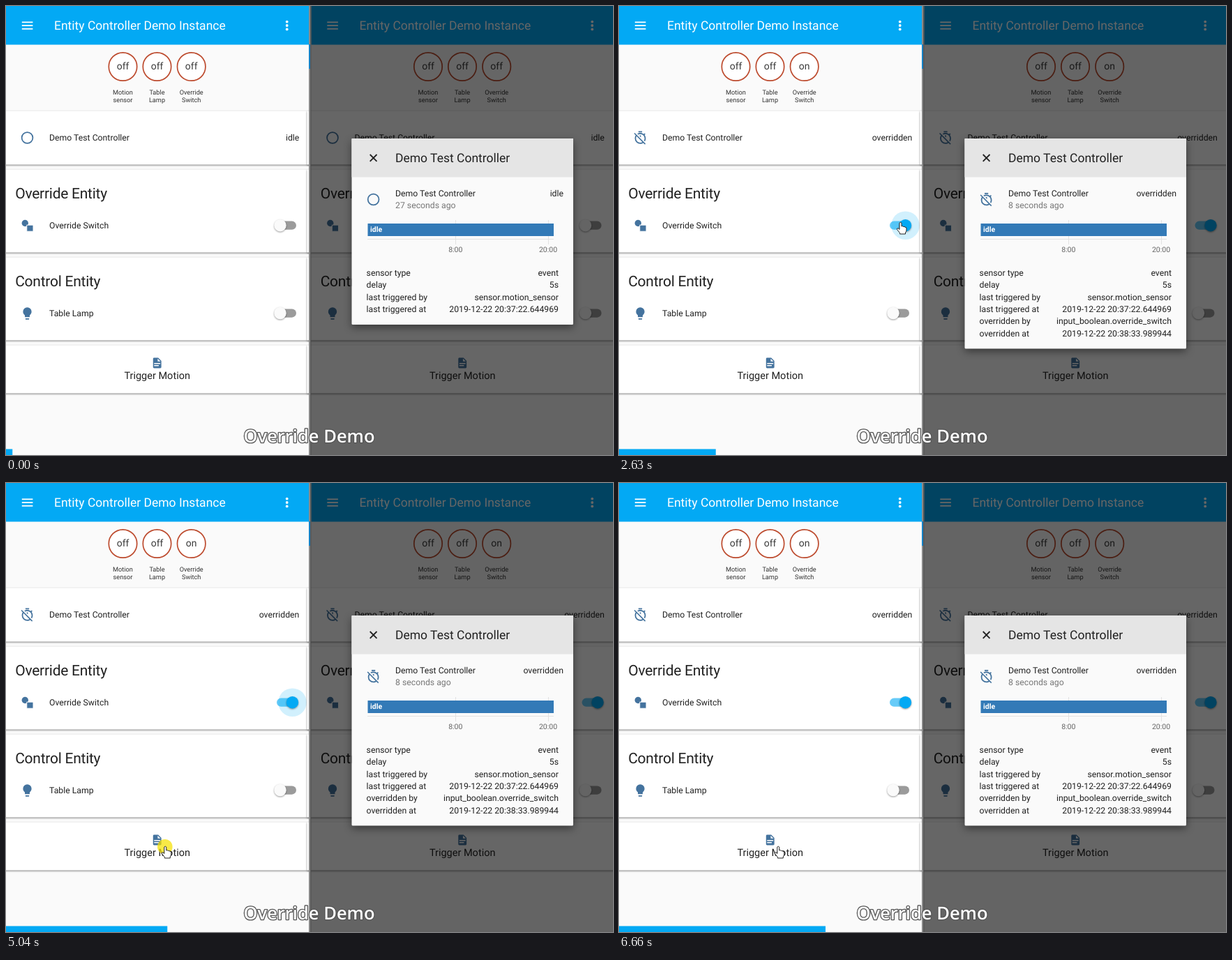
Write an HTML page that moves like this. It is 870 px wide and 644 px high and loops after 8000 ms.

```html
<!DOCTYPE html>
<html lang="en">
<head>
<meta charset="utf-8">
<title>Override Demo</title>
<style>
  html, body { margin: 0; width: 100%; height: 100%; overflow: hidden; background: #fafafa; }
  svg { display: block; width: 870px; height: 644px; }
  text { font-family: Roboto, sans-serif; font-size: 12.25px; fill: #212121; text-rendering: geometricPrecision; }
  .bar { font-size: 17.5px; fill: #fff; }
  .head { font-size: 21px; letter-spacing: -.012em; }
  .badge { font-size: 14px; fill: #3c3c3c; }
  .tiny { font-size: 9.2px; fill: #333; }
  .button { font-size: 14.5px; }
  .title { font-size: 17.5px; }
  .soft { fill: #777; }
  .tick { font-size: 10.5px; fill: #666; }
  .span { font-size: 10.5px; font-weight: 700; fill: #fff; }
  .caption { font: 600 25.5px "Open Sans", "Noto Sans", sans-serif; fill: #fff; stroke: #555; stroke-width: 2.6px; stroke-linejoin: round; paint-order: stroke; }
  .card { fill: #fff; filter: drop-shadow(0 1.4px 1.1px rgba(0,0,0,.5)); }
  .knob { filter: drop-shadow(0 1px 1.2px rgba(0,0,0,.4)); }
  .dialog { filter: drop-shadow(0 4px 6px rgba(0,0,0,.45)); }
  .icon { fill: #44739e; fill-rule: evenodd; }
  .cursor { fill: #fff; stroke: #222; stroke-width: 1; stroke-linejoin: round; }
</style>
</head>
<body>
<svg id="stage" viewBox="0 0 870 644"></svg>
<script>
const LOOP = 8000;
const run = (from, to, count) =>
  Array.from({ length: count }, (_, i) => from + (to - from) * i / (count - 1));
const times = [0, ...run(650, 1420, 8), 1540, 2190, 2310, 2410, 2520, 2630,
  ...run(3590, 4370, 8), 4490, 5040, 5150, 5250, 5350, 5470, 5580, 6450, 6660];

const paths = {
  timerOff: 'M12,20A7,7 0 0,1 5,13C5,11.72 5.35,10.5 5.95,9.5L15.5,19.04C14.5,19.65 13.28,20 12,20M3,4L1.75,5.27L4.5,8.03C3.55,9.45 3,11.16 3,13A9,9 0 0,0 12,22C13.84,22 15.55,21.45 17,20.5L19.5,23L20.75,21.73L13.04,14L3,4M11,9.44L13,11.44V8H11M15,1H9V3H15M19.04,4.55L17.62,5.97C16.07,4.74 14.12,4 12,4C10.17,4 8.47,4.55 7.05,5.5L8.5,6.94C9.53,6.35 10.73,6 12,6A7,7 0 0,1 19,13C19,14.27 18.65,15.47 18.06,16.5L19.5,17.94C20.45,16.53 21,14.83 21,13C21,10.88 20.26,8.93 19.03,7.39L20.45,5.97L19.04,4.55Z',
  bulb: 'M12,2A7,7 0 0,0 5,9C5,11.38 6.19,13.47 8,14.74V17A1,1 0 0,0 9,18H15A1,1 0 0,0 16,17V14.74C17.81,13.47 19,11.38 19,9A7,7 0 0,0 12,2M9,21A1,1 0 0,0 10,22H14A1,1 0 0,0 15,21V20H9V21Z',
  file: 'M13,9H18.5L13,3.5V9M6,2H14L20,8V20A2,2 0 0,1 18,22H6C4.89,22 4,21.1 4,20V4C4,2.89 4.89,2 6,2M15,18V16H6V18H15M18,14V12H6V14H18Z',
  arrow: 'M0 0V11L2.6 8.6 4.2 12.5 6 11.7 4.4 8H8Z',
  hand: 'M-1.5 1.2Q0-.8 1.5 1.2V6Q3 5 4.2 6.6Q5.6 5.8 6.6 7.3Q8.5 6.8 8.5 9V12Q8 14 7 15V17H-1V15.5Q-3 13-5 10.5Q-5.4 8.5-3.4 8.8L-1.5 10.5Z'
};

const rect = (x, y, w, h, fill, more = '') =>
  `<rect x="${x}" y="${y}" width="${w}" height="${h}" fill="${fill}" ${more}/>`;
const disc = (x, y, r, fill, more = '') =>
  `<circle cx="${x}" cy="${y}" r="${r}" fill="${fill}" ${more}/>`;
const text = (x, y, str, cls = '', anchor = 'start') =>
  `<text x="${x}" y="${y}" class="${cls}" text-anchor="${anchor}">${str}</text>`;
const icon = (name, x, y, k = .875) =>
  `<path class="icon" d="${paths[name]}" transform="translate(${x} ${y}) scale(${k}) translate(-12 -12)"/>`;
const stateIcon = (x, y, overridden) => overridden
  ? icon('timerOff', x, y)
  : disc(x, y, 7.9, 'none', 'stroke="#44739e" stroke-width="1.75"');

function badge(x, on, top, bottom) {
  return disc(x, 87, 20.2, '#fff', 'stroke="#bd4b2e" stroke-width="1.7"') +
    text(x, 91, on ? 'on' : 'off', 'badge', 'middle') +
    text(x, 126.8, top, 'tiny', 'middle') + text(x, 137.6, bottom, 'tiny', 'middle');
}

function toggle(y, p, ripple) {
  const x = 393 + 17.5 * p, on = p > 0;
  return rect(385 + 3 * p, y - 6.1, 31 - 2 * p, 12.25, on ? '#67cbf8' : '#9b9b9b', 'rx="6.1"') +
    (ripple ? disc(x, y, 20.3, on ? '#03a9f4' : '#000', `opacity="${on ? .18 : .055}"`) : '') +
    disc(x, y, 8.7, on ? '#03a9f4' : '#fafafa', 'class="knob"');
}

function panel(s) {
  const card = (y, h) => rect(-6, y, 446, h, '#fff', 'class="card"');
  return rect(0, 0, 436, 644, '#fafafa') +
    rect(0, 0, 436, 55.5, '#03a9f4') +
    [23.3, 28, 32.8].map(y => rect(22.8, y - .9, 15.6, 1.8, '#fff')).join('') +
    [22.6, 28, 33.4].map(y => disc(402.7, y, 1.9, '#fff')).join('') +
    text(69, 34, 'Entity Controller Demo Instance', 'bar') +
    badge(167.5, s.motion, 'Motion', 'sensor') +
    badge(216.5, false, 'Table', 'Lamp') +
    badge(265.7, s.over, 'Override', 'Switch') +
    card(150.5, 77) + stateIcon(30.5, 189, s.over) +
    text(62, 193.2, 'Demo Test Controller') +
    text(420.3, 193.2, s.over ? 'overridden' : 'idle', '', 'end') +
    card(234.5, 119) + text(13.2, 276, 'Override Entity', 'head') +
    disc(27.3, 311.5, 4.7, '#44739e') +
    rect(29.8, 314.2, 9.2, 9, '#44739e', 'stroke="#fff" stroke-width=".9"') +
    text(62, 319.2, 'Override Switch') + toggle(314.7, s.slide, s.ripple) +
    card(360.5, 119) + text(13.2, 402, 'Control Entity', 'head') +
    icon('bulb', 30.5, 441) + text(62, 445.2, 'Table Lamp') + toggle(440.5, 0, false) +
    card(486.5, 69) +
    (s.press ? rect(0, 486.5, 436, 69, '#000', `opacity="${.11 * s.press}"`) : '') +
    icon('file', 216.7, 512, .74) + text(216.7, 535, 'Trigger Motion', 'button', 'middle');
}

function dialog(over) {
  const rows = [['sensor type', 'event'], ['delay', '5s'],
    ['last triggered by', 'sensor.motion_sensor'],
    ['last triggered at', '2019-12-22 20:37:22.644969']];
  if (over) rows.push(['overridden by', 'input_boolean.override_switch'],
    ['overridden at', '2019-12-22 20:38:33.989944']);
  return rect(495.5, 190, 317.5, over ? 301.5 : 267, '#fafafa', 'class="dialog" rx="1.5"') +
    rect(495.5, 190, 317.5, 55.5, '#e5e5e5') +
    '<path d="M521.7 213l9.8 9.8m0-9.8l-9.8 9.8" stroke="#212121" stroke-width="1.8"/>' +
    text(558, 224, 'Demo Test Controller', 'title') +
    stateIcon(526.6, 277.5, over) +
    text(558, 272.6, 'Demo Test Controller') +
    text(558, 290, over ? '8 seconds ago' : '27 seconds ago', 'soft') +
    text(799, 272.6, over ? 'overridden' : 'idle', '', 'end') +
    '<path d="M644.5 307V342M777.5 307V342M518 334.5H785" stroke="#e2e2e2"/>' +
    rect(518.5, 312, 266.5, 18, '#337ab7') +
    text(522, 324.3, 'idle', 'span') +
    text(644.3, 352.6, '8:00', 'tick', 'middle') + text(777, 352.6, '20:00', 'tick', 'middle') +
    rows.map(([k, v], i) => {
      const y = 386.8 + 17.35 * i;
      return text(516.6, y, k) + text(792, y, v, '', 'end');
    }).join('');
}

const curve = (a, c, b, u) =>
  a.map((v, i) => (1 - u) ** 2 * v + 2 * u * (1 - u) * c[i] + u * u * b[i]);

function pointer(n) {
  if (n < 2) return '';
  let pos, shape = 'hand';
  if (n < 10) {
    pos = curve([568, 622], [475, 420], [408, 312], (n - 2) / 7);
    shape = 'arrow';
  } else if (n < 16) pos = [403.5, 310];
  else if (n < 24) {
    pos = curve([404, 310], [363, 420], [234, 521], (n - 15) / 8);
    shape = 'arrow';
  } else pos = [228.3, 521];
  const click = n === 11 || n === 25;
  return (click ? disc(pos[0] - .5, pos[1] + .7, 10.8, '#f5e100', 'opacity=".72"') : '') +
    `<path class="cursor" d="${paths[shape]}" transform="translate(${pos})"/>`;
}

// n counts the steps of the loop, starting at 1
function scene(n) {
  const left = {
    motion: n >= 27 && n < 32,
    over: n >= 13,
    slide: n < 12 ? 0 : n === 12 ? .5 : 1,
    ripple: n >= 11 && n < 26,
    press: { 26: .4, 27: .8, 28: 1, 29: .5 }[n] || 0
  };
  const over = n >= 14;
  const right = { motion: n >= 28 && n < 31, over, slide: over ? 1 : 0 };
  return panel(left) +
    `<g transform="translate(437.5 0)">${panel(right)}</g>` +
    rect(437, 0, 433, 644, '#000', 'opacity=".6"') +
    rect(434, 0, 3, 644, '#8a8a8a') + rect(434, 55, 3, 35, '#1583c8') +
    rect(436, 0, 1.5, 644, '#555') +
    dialog(over) +
    rect(0, 635.5, 9.25 * n, 8.5, '#03a9f4') +
    text(434.5, 626, 'Override Demo', 'caption', 'middle') +
    pointer(n);
}

const stage = document.getElementById('stage');
const start = performance.now();
let shown = 0;
function tick() {
  const t = (performance.now() - start) % LOOP;
  const n = times.filter(v => v <= t).length;
  if (n !== shown) stage.innerHTML = scene(shown = n);
  requestAnimationFrame(tick);
}
tick();
</script>
</body>
</html>
```
